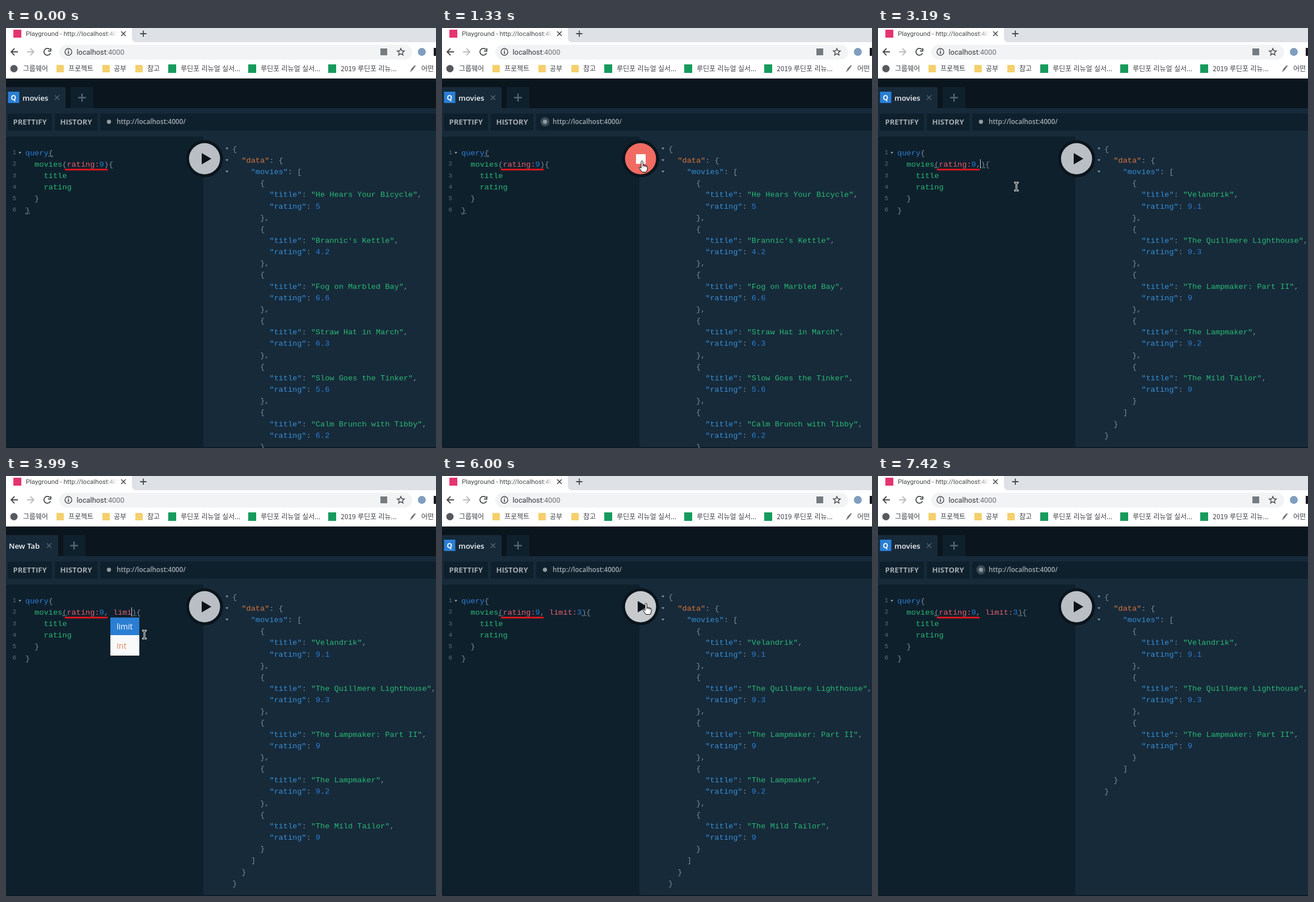
An HTML page for the animation above (7.74 s loop, 758 by 739 pixels).

```html
<!DOCTYPE html>
<html lang="ko">
<head>
<meta charset="utf-8">
<title>Playground</title>
<style>
  html, body { margin: 0; width: 100%; height: 100%; overflow: hidden; background: #172a3a; }
  svg { display: block; width: 758px; height: 739px; }
  text { white-space: pre; }
  .ui { font-family: "Open Sans", sans-serif; font-size: 13.3px; font-weight: 600; }
  .chrome { font-family: Roboto, sans-serif; }
  .mark { font: 12px "Noto Sans CJK KR", "Noto Sans CJK", sans-serif; fill: #3c4043; }
  .code { font: 13.6px "Liberation Mono", monospace; fill: #7d8b95; }
  .num { font-size: 11px; fill: #5d6e7a; text-anchor: end; }
  .blue { fill: #2a7ed3; }
  .key { fill: #368fd6; }
  .root { fill: #d8733c; }
  .str { fill: #29b973; }
  .arg { fill: #e3606d; }
  .pair { text-decoration: underline; }
  .line { fill: none; stroke-width: 2; }
</style>
</head>
<body>
<svg viewBox="0 0 758 739" xmlns="http://www.w3.org/2000/svg">
  <defs>
    <linearGradient id="fade">
      <stop offset="0" stop-color="#fff" stop-opacity="0"/><stop offset="1" stop-color="#fff"/>
    </linearGradient>
    <path id="fold" d="M-2.5 -1.5h5l-2.5 3.5z" fill="#8b98a2"/>
    <path id="cross" d="M-4 -4l8 8m0 -8l-8 8" fill="none"/>
    <path id="plus" d="M-7 0H7M0 -7V7" fill="none"/>
  </defs>

  <!-- Browser -->
  <path fill="#dee1e6" d="M0 0h758v26H0z"/>
  <path fill="#fff" d="M0 0h222v18q0 7 7 7h529v64H0z"/>
  <path fill="#d5d8dc" d="M0 88h758v1H0z"/>
  <path fill="#e5356f" d="M13 3h14v14H13z"/>
  <g class="chrome">
    <text x="35" y="14" font-size="11.5" fill="#45494d">Playground - http://localhost:4000</text>
    <path d="M196 2h22v18h-22z" fill="#fff"/>
    <path d="M176 2h20v18h-20z" fill="url(#fade)"/>
    <rect x="94" y="29.500" width="622" height="26" rx="13" fill="#f1f3f4"/>
    <text x="124.500" y="46.500" font-size="12.8" fill="#33373b">localhost<tspan fill="#6b7075">:4000</tspan></text>
  </g>
  <g stroke="#45494d" stroke-width="1.6">
    <use href="#cross" x="207" y="10"/>
    <path d="M236.500 10h11M242 4.500v11" stroke-width="1.8"/>
  </g>
  <g class="line" stroke="#45494d" style="stroke-width:1.8">
    <path d="M21 42H9m6 -6l-6 6 6 6"/>
    <path d="M37 42h12m-6 -6l6 6 -6 6" stroke="#b9bcc0"/>
    <path d="M77.500 38a6 6 0 1 0 1 6M79 35.500v5h-5"/>
    <circle cx="110" cy="42" r="6" stroke-width="1.4"/>
    <path d="M110 41v4.500M110 38v1.500"/>
    <path d="M696 36l1.800 4 4.400 .4 -3.300 2.900 1 4.300 -3.900 -2.300 -3.900 2.300 1 -4.300 -3.300 -2.900 4.400 -.4z" style="stroke-width:1.4"/>
  </g>
  <path fill="#767b80" d="M660 36h12v12h-12z"/>
  <circle cx="733" cy="42" r="7" fill="#7f9fbd"/>
  <path fill="#15191d" d="M754 35h4v14h-4z"/>
  <g id="bookmarks" class="mark">
    <circle cx="14" cy="71.500" r="6.500" fill="#55595e"/>
    <path d="M712 78l3 -7 6 -6 1 2 -5 7z" fill="#777"/>
  </g>

  <!-- Playground -->
  <path fill="#0a151d" d="M0 89h758v52H0z"/>
  <path fill="#172a3a" d="M0 141h758v598H0z"/>
  <path fill="#0f202d" d="M0 191h348v548H0zM3 150.500h78v30H3zM86 150.500h75v30H86zM169 150.500h589v30H169q-3 0 -3 -3v-24q0 -3 3 -3z"/>
  <path fill="#0d1b26" d="M0 737h758v2H0z"/>
  <g class="ui">
    <g id="tabMovies">
      <path fill="#172a3a" d="M0 104h103q2 0 2 2v35H0z"/>
      <path fill="#0f202d" d="M114 104h40v37h-40z"/>
      <path fill="#2a7ed3" d="M3.500 112h20v20h-20z"/>
      <text x="8.500" y="126.500" font-size="12" font-weight="700" fill="#fff">Q</text>
      <text x="29" y="127.500" fill="#f3f4f5">movies</text>
      <g class="line" stroke="#56656f">
        <use href="#cross" x="90" y="122.500" style="stroke-width:1.5"/><use href="#plus" x="134" y="122.500" style="stroke-width:2.500"/>
      </g>
    </g>
    <g id="tabNew">
      <path fill="#172a3a" d="M0 104h90q2 0 2 2v35H0z"/>
      <path fill="#0f202d" d="M101 104h39v37h-39z"/>
      <text x="5" y="127.500" fill="#f3f4f5">New Tab</text>
      <g class="line" stroke="#56656f">
        <use href="#cross" x="76" y="122.500" style="stroke-width:1.5"/><use href="#plus" x="120" y="122.500" style="stroke-width:2.500"/>
      </g>
    </g>
    <g fill="#a4abb1">
      <g font-size="13.1" font-weight="700">
        <text x="12.500" y="169.500">PRETTIFY</text>
        <text x="95.500" y="169.500">HISTORY</text>
      </g>
      <text x="195" y="169" font-size="11.7">http://localhost:4000/</text>
      <circle id="ring" cx="181.500" cy="165" r="8" fill="#3d4b56"/>
      <circle cx="181.500" cy="165" r="3.700" fill="#929ba2"/>
    </g>
  </g>

  <g id="results" class="code"></g>
  <g id="folds"><use href="#fold" x="389.500" y="212"/><use href="#fold" x="389.500" y="232.500"/><use href="#fold" x="389.500" y="252.500"/></g>
  <g id="editor" class="code"></g>
  <use href="#fold" x="24.500" y="219.500"/>
  <path id="caret" d="M0 231v16" stroke="#c8cdd1"/>
  <path d="M105 249.200h73" stroke="#ee151b" stroke-width="2.800" stroke-linecap="round"/>

  <circle cx="350" cy="230" r="32.700" fill="#0a151d"/>
  <circle id="button" cx="350" cy="230" r="27.400"/>
  <path id="play" d="M345 220l17 10 -17 10z" fill="#0b1219"/>
  <path id="stop" d="M342 222h17v17h-17z" fill="#fff"/>

  <g id="popup" class="ui" style="font-size:13.9px;font-weight:400">
    <path fill="#f8f9fa" d="M184 249h51v67h-51z"/>
    <path fill="#2a7ed3" d="M184 249h51v31h-51z"/>
    <text x="195" y="269.500" fill="#fff">limit</text>
    <text x="195" y="303.500" fill="#dc8a55">Int</text>
  </g>

  <g id="pointer" fill="#000" stroke="#fff">
    <path id="arrow" d="M.5 .5v15.500l3.600 -3.400 2.400 5.400 2.500 -1.100 -2.400 -5.300h4.900z"/>
    <g id="hand" transform="translate(-5 -1)" fill="#fff" stroke="#000">
      <path d="M4 2.500a1.600 1.600 0 0 1 3.200 0V8l5.800 1.300q2 .5 2 2.500v4l-1.800 4.700H5.600L.6 13.500q-.4 -2 1.400 -1.700l2 1.900z"/>
      <path d="M7.200 8v3M10 9v2.500M12.600 9.500v2.500"/>
    </g>
    <path id="beam" d="M-3.500 -8h2.500l1 .8 1 -.8h2.500v2h-2.500v12h2.500v2h-2.500l-1 -.8 -1 .8h-2.500v-2h2.500v-12h-2.500z"/>
  </g>
</svg>
<script>
const LOOP = 7740, PITCH = 8.16, LEADING = 20.16;
const $ = id => document.getElementById(id);
const show = (id, on) => { $(id).style.display = on ? "" : "none"; };
const during = (t, ...spans) => spans.some(([from, to]) => t >= from && t < to);
const span = (cls, text) => `<tspan class="${cls}">${text}</tspan>`;
const line = (x, y, body) => `<text x="${x}" y="${y}">${body}</text>`;

// Bookmark bar
const folder = x => `<path fill="#f6cf6d" d="M${x} 65h11q2 0 2 2v11h-13z"/>`;
const sheet = x => `<path fill="#169b5b" d="M${x} 64h14v15h-14z"/>`;
$("bookmarks").innerHTML += folder(89) + folder(170) + folder(228) + sheet(286) + sheet(427) + sheet(568) +
  [[30, "그룹웨어"], [110, "프로젝트"], [190, "공부"], [249, "참고"], [308, "루딘포 리뉴얼 실서..."],
   [449, "루딘포 리뉴얼 실서..."], [590, "2019 루딘포 리뉴..."], [732, "어떤"]]
    .map(([x, label]) => line(x, 75.5, label)).join("");

// Responses
const before = [["He Hears Your Bicycle", 5], ["Brannic's Kettle", 4.2], ["Fog on Marbled Bay", 6.6],
  ["Straw Hat in March", 6.3], ["Slow Goes the Tinker", 5.6], ["Calm Brunch with Tibby", 6.2]];
const rated = [["Velandrik", 9.1], ["The Quillmere Lighthouse", 9.3], ["The Lampmaker: Part II", 9],
  ["The Lampmaker", 9.2], ["The Mild Tailor", 9]];

function colour(row) {
  return row.replace(/("[^"]*")(:?)|[\d.]+/g, (all, text, colon) =>
    !text ? span("blue", all)
    : !colon ? span("str", text)
    : span(text === '"data"' ? "root" : "key", text) + colon);
}
function response(list) {
  const movies = list.map(([title, rating]) => ({ title, rating }));
  return JSON.stringify({ data: { movies } }, null, 2).split("\n").map((row, i) => {
    const body = row.trimStart();
    return line(399 + (row.length - body.length) * PITCH, 216.7 + i * LEADING, colour(body));
  }).join("");
}
const responses = [before, rated, rated.slice(0, 3)].map(response);

// Query editor
const typedAt = [3190, 3350, 3520, 3670, 3820, 3990, 4220, 4540, 5000];
const addition = ", limit:3";

function query(typed, inside) {
  const outer = inside ? "" : "pair", inner = inside ? "pair" : "";
  const extra = addition.slice(0, typed);
  const rows = [
    [0, span("blue", "query") + span(outer, "{")],
    [2, span("str", "movies") + span(inner, "(") + span("arg", "rating:") + span("blue", "9") +
        extra.slice(0, 2) + span("arg", extra.slice(2, 8)) + span("blue", extra.slice(8)) + span(inner, ")") + "{"],
    [4, span("str", "title")],
    [4, span("str", "rating")],
    [2, "}"],
    [0, span(outer, "}")]
  ];
  return rows.map(([indent, body], i) => {
    const y = 223.8 + i * LEADING;
    return `<text class="num" x="18" y="${y - 1.5}">${i + 1}</text>` + line(34 + indent * PITCH, y, body);
  }).join("");
}

// Pointer path: time, x, y
const path = [[140, 667, 731], [850, 378, 270], [930, 358, 246], [1100, 352, 234], [1720, 352, 234],
  [2262, 187, 239], [2410, 173, 247], [2560, 173, 247], [3030, 244, 279], [5070, 244, 279],
  [5382, 324, 184], [5850, 358, 227], [5930, 359, 224], [6880, 359, 224], [7340, 633, 693]];

function pointerAt(t) {
  const time = Math.min(7340, Math.max(140, Math.floor(t / 78) * 78));
  const i = Math.max(1, path.findIndex(p => p[0] >= time));
  const [a, b] = [path[i - 1], path[i]];
  const k = (time - a[0]) / (b[0] - a[0]);
  return [a[1] + (b[1] - a[1]) * k, a[2] + (b[2] - a[2]) * k];
}

const cache = {};
function fill(id, key, make) {
  if (cache[id] !== key) { cache[id] = key; $(id).innerHTML = make(); }
}

function draw(t) {
  const typed = typedAt.filter(at => at <= t).length;
  const inside = t >= 2640;
  fill("editor", `${typed}${inside}`, () => query(typed, inside));
  const page = t < 1480 ? 0 : t < 6490 ? 1 : 2;
  fill("results", page, () => responses[page]);

  const renamed = during(t, [3670, 5150]);
  show("tabNew", renamed);
  show("tabMovies", !renamed);
  show("popup", during(t, [3670, 4220]));
  show("folds", !during(t, [1480, 1800], [6490, 6960]));
  show("ring", during(t, [1250, 1480], [2960, 3190], [4460, 4770], [6240, 6490], [7340, LOOP]));
  $("ring").setAttribute("r", during(t, [4460, 4770]) ? 6 : 8);
  show("caret", during(t, [2640, 2960], [3190, 4460], [4540, 5150]));
  $("caret").setAttribute("transform", `translate(${Math.round(34 + (17 + typed) * PITCH) - .5} 0)`);

  const [x, y] = pointerAt(t);
  const visible = during(t, [140, 7420]);
  const hover = visible && Math.hypot(x - 350, y - 230) < 33;
  const text = !hover && y > 191 && (x > 395 || x > 30 && x < 348);
  show("pointer", visible);
  $("pointer").setAttribute("transform", `translate(${x} ${y})`);
  show("hand", hover);
  show("beam", text);
  show("arrow", !hover && !text);

  const running = during(t, [1250, 1480], [6160, 6490]);
  $("button").setAttribute("fill", running ? "#f26b63" : hover ? "#c7cacd" : "#b9bfc4");
  show("play", !running);
  show("stop", running);
}

const start = performance.now();
function tick() {
  draw((performance.now() - start) % LOOP);
  requestAnimationFrame(tick);
}
tick();
</script>
</body>
</html>
```
